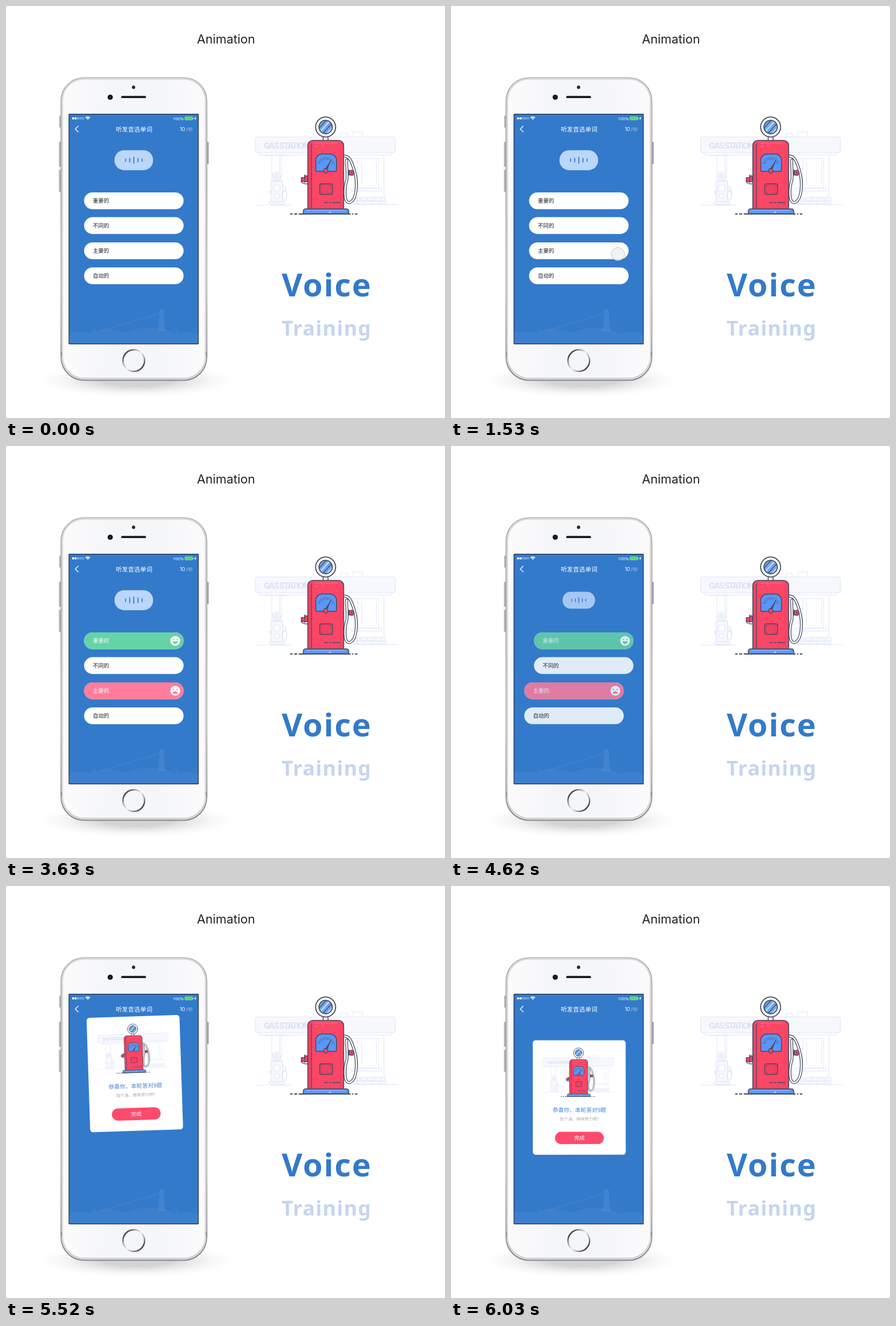
These frames come from a looping animation (773x725 px, 6.06 s). An HTML page with a canvas:

```html
<!DOCTYPE html>
<html lang="zh-CN">
<head>
<meta charset="utf-8">
<title>Voice Training</title>
<style>
html, body { margin: 0; width: 100%; height: 100%; overflow: hidden; background: #fff; }
canvas { display: block; width: 773px; height: 725px; }
</style>
</head>
<body>
<canvas id="stage"></canvas>
<script>
const W = 773, H = 725, LOOP = 6060, TAU = Math.PI * 2;
const dpr = window.devicePixelRatio || 1;
const CJK = '"Noto Sans CJK SC", "Noto Sans CJK", sans-serif';
const SANS = '"Noto Sans", "Open Sans", sans-serif';
const INK = '#434b5e', RED = '#fb4666', BLUE = '#5b95f5', SKY = '#337acb';

function surface(canvas) {
  canvas.width = W * dpr;
  canvas.height = H * dpr;
  const ctx = canvas.getContext('2d');
  ctx.scale(dpr, dpr);
  return ctx;
}
const main = surface(document.getElementById('stage'));
const still = surface(document.createElement('canvas'));
const layer = surface(document.createElement('canvas'));
let c = still;

const clamp = v => Math.max(0, Math.min(1, v));
const span = (t, start, dur) => clamp((t - start) / dur);
const smooth = p => p * p * (3 - 2 * p);

function paint(fill, stroke, width = 1) {
  if (fill) { c.fillStyle = fill; c.fill(); }
  if (stroke) { c.strokeStyle = stroke; c.lineWidth = width; c.stroke(); }
}
function box(x, y, w, h, r, fill, stroke, width) {
  c.beginPath();
  c.roundRect(x, y, w, h, r);
  paint(fill, stroke, width);
}
function disc(x, y, r, fill, stroke, width) {
  c.beginPath();
  c.arc(x, y, r, 0, TAU);
  paint(fill, stroke, width);
}
function line(pts, color, width = 1) {
  c.beginPath();
  for (let i = 0; i < pts.length; i += 2) c.lineTo(pts[i], pts[i + 1]);
  paint(null, color, width);
}
function path(d, fill, stroke, width = 1) {
  const p = new Path2D(d);
  if (fill) { c.fillStyle = fill; c.fill(p); }
  if (stroke) { c.strokeStyle = stroke; c.lineWidth = width; c.stroke(p); }
}
function text(s, x, y, font, color, align = 'left', spacing = 0) {
  c.font = font;
  c.textAlign = align;
  c.letterSpacing = spacing + 'px';
  c.fillStyle = color;
  c.fillText(s, x, y);
  c.letterSpacing = '0px';
}
function gradient(x0, y0, x1, y1, ...stops) {
  const g = c.createLinearGradient(x0, y0, x1, y1);
  stops.forEach((s, i) => g.addColorStop(i / (stops.length - 1), s));
  return g;
}
// Draws a group flat, then blends it as a whole.
function group(alpha, drawParts) {
  if (alpha <= 0) return;
  c = layer;
  c.clearRect(0, 0, W, H);
  c.save();
  drawParts();
  c.restore();
  c = main;
  c.globalAlpha = alpha;
  c.drawImage(layer.canvas, 0, 0, W, H);
  c.globalAlpha = 1;
}

function station() {
  const edge = '#e0e5f6', pale = '#f7f8fe';
  box(590, 224, 11, 7, 0, '#fff', edge);
  box(611, 221.5, 17, 9, 0, '#fff', edge);
  // shop
  line([592, 263, 592, 350], edge);
  line([665.5, 263, 665.5, 337], edge);
  box(612, 268.5, 44, 52, 0, '#fff', edge);
  line([619.5, 269, 619.5, 320], edge);
  line([626, 274, 626, 314], edge);
  line([652.5, 274, 652.5, 314], edge);
  box(607, 321, 54, 4.5, 0, '#fff', edge);
  box(616, 337, 53, 6, 0, pale, edge);
  box(611, 343, 58, 6, 0, pale, edge);
  for (let i = 0; i < 4; i++) {
    line([624 + i * 12, 337, 624 + i * 12, 343], edge);
    line([618 + i * 13, 343, 618 + i * 13, 349], edge);
  }
  line([612, 349.5, 691, 349.5], edge);
  // column and small pump
  box(454, 258, 44, 5, 0, '#fff', edge);
  box(468, 263, 17, 83, 0, '#fff', edge);
  line([482, 264, 482, 292], edge);
  line([440, 350.5, 461, 350.5], edge);
  line([465, 350.5, 502, 350.5], edge);
  disc(476.5, 300, 7, '#fff', edge, 1.5);
  disc(476.5, 300, 4, '#eef1fb', edge);
  box(467, 308, 20, 37, 3, pale, edge, 1.3);
  box(470.5, 315, 12, 10, [4, 4, 0, 0], '#fff', edge);
  box(473, 331, 8, 6, 1, '#fff', edge);
  box(463, 345, 28, 4.5, 1, pale, edge);
  line([463, 327, 466, 327, 466, 331], edge, 2);
  path('M487 317 C496 318 496 341 490 342 C485 342 486 330 490 322', null, edge, 1.5);
  disc(492, 326, 1.6, edge);
  // canopy
  box(446, 256, 233, 6, 1, '#fff', edge);
  box(439.5, 230.5, 246, 27.5, 4, pale, edge, 1.2);
  text('GAS STATION', 454, 250.5, 'bold 15.5px "Roboto", "Liberation Sans", sans-serif', '#dce1f5', 'left', -1.8);
}

function pump() {
  c.lineJoin = c.lineCap = 'round';
  // hose
  const hose = 'M596 264 C605 264 609 275 613 288 C620 311 618 341 605 346 C594 347 596 319 600 307 C602 300 599 276 600 271';
  path(hose, null, INK, 5);
  path(hose, null, '#fff', 2.5);
  disc(608.5, 293.5, 4.4, RED, INK, 1.5);
  line([604, 288.5, 604, 298], INK, 1.6);
  disc(609, 293.5, 1.4, null, INK, .8);
  // side nozzle
  path('M531 299 L526 299 L526 302 L520 302 L520 309 L531 309 Z', RED, INK, 1.5);
  path('M520 308 Q521 314 531 313', null, INK, 1.4);
  line([526, 297, 526, 311], INK, 1.4);
  // lamp
  box(558.5, 229, 8.5, 10, 0, '#fff', INK, 1.5);
  disc(562.8, 213, 17.6, '#fff', INK, 1.8);
  disc(562.8, 213, 11.8, '#70a6f3');
  c.save();
  disc(562.8, 213, 11.8);
  c.clip();
  for (let i = -2; i <= 2; i++) {
    const o = i * 6;
    line([549 + o, 226 + o * .3, 573 + o, 199 + o * .3], i % 2 ? INK : '#c4dcff', i % 2 ? 1.3 : 2.2);
  }
  c.restore();
  disc(562.8, 213, 11.8, null, INK, 1.7);
  // body
  box(531.5, 236.5, 63, 121, [9, 9, 0, 0], RED, INK, 1.7);
  box(532.6, 243, 4.6, 114, 0, '#ee4163');
  line([538, 242, 538, 356], INK, 1.2);
  line([589, 250, 589, 356], '#ee4163', 1.6);
  line([545, 241, 583, 241], '#ff7088', 1.2);
  disc(547, 247, .9, '#ff9cac');
  disc(558, 245, .9, '#ff9cac');
  // dial
  box(545.5, 260.5, 36.5, 30.5, [11, 11, 2, 2], BLUE, INK, 1.5);
  for (let i = 0; i <= 10; i++) {
    const a = Math.PI * (1.12 + i * .076), inner = i % 2 ? 12.6 : 11;
    const dx = Math.cos(a), dy = Math.sin(a);
    line([563.5 + dx * 14.6, 281 + dy * 14.6, 563.5 + dx * inner, 281 + dy * inner], INK, .9);
  }
  path('M561.8 287 L572 272 L565 288.5 Z', INK, INK, .7);
  disc(563, 290, 3.8, RED, INK, 1.4);
  // badge
  box(552.5, 313, 22.5, 18.5, 3, '#f23f62', INK, 1.4);
  for (const x of [556, 571.5]) for (const y of [316.5, 328]) disc(x, y, .8, INK);
  for (const [x, w] of [[561, 5], [569, 3], [575, 13]]) line([x, 346, x + w, 346], INK, 1.3);
  // base and ground
  box(523.5, 357, 80, 9, [4, 4, 0, 0], BLUE, INK, 1.6);
  line([529, 360, 597, 360], '#86b2fb', 1.3);
  line([569, 363, 572, 363], '#d9e8ff', 1.3);
  for (const [x, w] of [[501, 3], [508, 4], [516, 90], [610, 1], [615, 3]]) line([x, 366, x + w, 366], INK, 1.8);
  c.lineJoin = 'miter';
  c.lineCap = 'butt';
}

function phone() {
  c.save();
  c.translate(230, 659);
  c.scale(1, .17);
  const g = c.createRadialGradient(0, 0, 60, 0, 0, 168);
  g.addColorStop(0, 'rgba(90,90,95,.26)');
  g.addColorStop(.6, 'rgba(120,120,125,.08)');
  g.addColorStop(1, 'rgba(140,140,140,0)');
  disc(0, 0, 170, g);
  c.restore();

  const steel = gradient(92, 0, 98, 0, '#d4d4d6', '#8d8f92');
  box(93.5, 193, 4, 21, 1, steel);
  box(93, 239, 4, 44, 1, steel);
  box(93, 288, 4, 39, 1, steel);
  box(353, 239, 4, 39, 1, '#a5a6a9');
  box(96, 125.5, 258.5, 534, 41, gradient(0, 125, 0, 660, '#b0b0b2', '#a0a1a4', '#b4b5b7', '#858689'));
  box(97.8, 127, 254.9, 530.5, 39.5, '#e2e3e5');
  box(99.2, 128.3, 252.1, 527.5, 38, '#c6c7ca');
  box(100.2, 129.2, 250.1, 525, 37, gradient(100, 0, 351, 0, '#fbfbfc', '#f5f6f8', '#f5f6f8', '#fbfbfc'));
  line([96, 609, 98, 609, 98, 616, 96, 616], '#85878a', 1);
  line([354.5, 609, 352.5, 609, 352.5, 616, 354.5, 616], '#85878a', 1);

  disc(183.5, 160.5, 4.6, '#15151d');
  disc(183.5, 160.5, 2, '#20203a');
  disc(224.6, 143, 2.9, '#27272b');
  box(202.8, 158.3, 43.8, 3.8, 2, '#18181a');
  disc(225, 624, 19, '#f5f6f8', gradient(209, 610, 241, 638, '#2b2b2b', '#a0a0a0', '#f4f4f4', '#a0a0a0', '#2b2b2b'), 2.5);
  box(110.3, 189.8, 229, 405.4, 1, '#16233a');
}

function scenery() {
  c.fillStyle = SKY;
  c.fillRect(111.5, 191, 226.7, 403);
  path('M268 540 L165 571 L172 572 L270 543 Z', 'rgba(255,255,255,.04)');
  path('M270 544 L269 537 L274 533 L279 537 L278 544 L281 572 L267 572 Z', 'rgba(255,255,255,.07)');
  const hill = 'rgba(255,255,255,.045)';
  c.beginPath();
  for (const [x, y, rx, ry] of [[124, 594, 46, 21], [180, 594, 49, 25], [253, 594, 57, 28], [318, 594, 42, 20]]) {
    c.moveTo(x - rx, y);
    c.ellipse(x, y, rx, ry, 0, Math.PI, TAU);
  }
  paint(hill);
  for (const [x, y] of [[151, 569], [156, 571], [294, 569], [299, 571]]) box(x, y - 4, 3, 8, 1.5, hill);
}

function header() {
  for (let i = 0; i < 5; i++) disc(118 + i * 4.4, 197.7, i < 2 ? 2 : 1.6, i < 2 && '#fff', i >= 2 && '#fff', .6);
  for (const r of [2.2, 4.2, 6.2]) {
    c.beginPath();
    c.arc(144, 200.5, r - .7, -Math.PI * .76, -Math.PI * .24);
    paint(null, '#fff', 1.3);
  }
  text('100%', 313, 200.5, '7.6px ' + SANS, '#fff', 'right');
  box(315, 194.8, 13.5, 5.8, 1, '#4fdc66', '#a9e9bd', .6);
  box(329, 196.5, 1.2, 2.4, .5, '#a9e9bd');
  path('M334 194 L331.4 198.2 L333 198.2 L332.2 201.4 L335 197 L333.5 197 Z', '#fff');
  line([127.5, 211, 122, 216.5, 127.5, 222], '#fff', 1.3);
  text('听发音选单词', 225.5, 220.7, '10.7px ' + CJK, '#fff', 'center');
  text('10', 306, 220, '9.2px Inter, sans-serif', '#fff', 'left', -.3);
  text('/10', 317, 220, '8px Inter, sans-serif', 'rgba(255,255,255,.68)', 'left', .1);
}

function wave(t, p) {
  const k = 1 - p ** 1.6;
  group(k, () => {
    c.translate(225, 271.3);
    c.scale(k, k);
    box(-34, -17.6, 68, 35.2, 17, '#bad6fb');
    const swing = .5 - .5 * Math.cos(t / 765 * TAU);
    [[6, 1], [8, 4.5], [12.5, .5], [8, 4.5], [6, 1]].forEach(([h, grow], i) => {
      const len = h + grow * swing;
      box(-15.4 + i * 7.3, -len / 2, 1.8, len, .9, '#3d7cce');
    });
  });
}

function face(x, y, color, happy) {
  disc(x, y, 8.6, '#fff');
  disc(x - 3.3, y - 2.2, 1.2, color);
  disc(x + 3.3, y - 2.2, 1.2, color);
  c.beginPath();
  if (happy) c.arc(x, y + 1, 4.7, 0, Math.PI);
  else c.arc(x, y + 5.4, 4.5, Math.PI, TAU);
  c.closePath();
  paint(color);
}

const options = [
  { label: '重要的', y: 328, tint: '#66d3a6', at: 2200, faceAt: 2670, happy: true },
  { label: '不同的', y: 371.6 },
  { label: '主要的', y: 415.9, tint: '#ff7d9b', at: 1860, faceAt: 2370 },
  { label: '自动的', y: 460 }
];

function option(o, color, ink) {
  box(137.5, o.y, 175.2, 29.6, 14.8, color);
  text(o.label, 153, o.y + 18.4, '9.5px ' + CJK, ink);
}

function choices(t, p) {
  group(1 - p ** 1.63, () => {
    options.forEach((o, i) => {
      c.save();
      c.translate((i < 2 ? 1 : -1) * 275 * p ** 3, 0);
      option(o, '#fff', '#1d1d1f');
      if (o.tint) {
        c.globalAlpha = smooth(span(t, o.at, 240));
        option(o, o.tint, '#f7fbff');
        const q = span(t, o.faceAt, 420);
        c.globalAlpha = clamp(q * 2);
        face(298 + 30 * (1 - q) ** 3, o.y + 14.8, o.tint, o.happy);
      }
      c.restore();
    });
  });
}

function touch(t) {
  group(smooth(span(t, 1380, 120)) * (1 - smooth(span(t, 1740, 150))), () => {
    disc(294, 436.5, 11.6, 'rgba(238,240,240,.78)', 'rgba(170,175,178,.75)', .9);
  });
}

// Straight approach, then a damped swing around rest.
function cardOffset(t) {
  const s = (t - 5490) / 1000;
  return s < 0 ? -s / .09 : -.4 * Math.sin(TAU * 2.5 * s) * Math.exp(-8 * s);
}

function card(t) {
  const s = cardOffset(t);
  group(span(t, 5190, 300), () => {
    c.translate(225.7 - 7 * s, 373.5 + 297 * s);
    c.rotate(12.9 * s * Math.PI / 180);
    c.translate(-225.7, -373.5);
    box(144, 272.8, 163.6, 201.4, 5, '#fff');
    c.save();
    c.translate(162.5, 295);
    c.scale(.506, .502);
    c.translate(-440, -213);
    station();
    pump();
    c.restore();
    text('恭喜你，本轮答对9题', 226, 399, '9.9px ' + CJK, '#3f80d8', 'center');
    text('加个油，继续努力吧！', 228, 413.7, '7.3px ' + CJK, '#a6a6a8', 'center');
    box(183, 433.8, 86, 21.6, 10.8, '#fc4b6d');
    text('完成', 226, 448, '9.4px ' + CJK, '#fff', 'center');
  });
}

function backdrop() {
  c.fillStyle = '#fff';
  c.fillRect(0, 0, W, H);
  text('Animation', 387.5, 65.5, '21.7px Inter, sans-serif', '#222', 'center');
  phone();
  station();
  pump();
  text('Voice', 485.5, 511.3, 'bold 56px ' + SANS, SKY, 'left', 2);
  text('Training', 485, 580.3, 'bold 36px ' + SANS, '#c5d5ef', 'left', 1.3);
  scenery();
}

function draw(t) {
  c.drawImage(still.canvas, 0, 0, W, H);
  c.save();
  c.beginPath();
  c.rect(111.5, 191, 226.7, 403);
  c.clip();
  const leave = span(t, 4470, 480);
  wave(t, leave);
  choices(t, leave);
  touch(t);
  card(t);
  header();
  c.restore();
}

backdrop();
c = main;
const begin = performance.now();
function tick() {
  draw((performance.now() - begin) % LOOP);
  requestAnimationFrame(tick);
}
tick();
</script>
</body>
</html>
```
